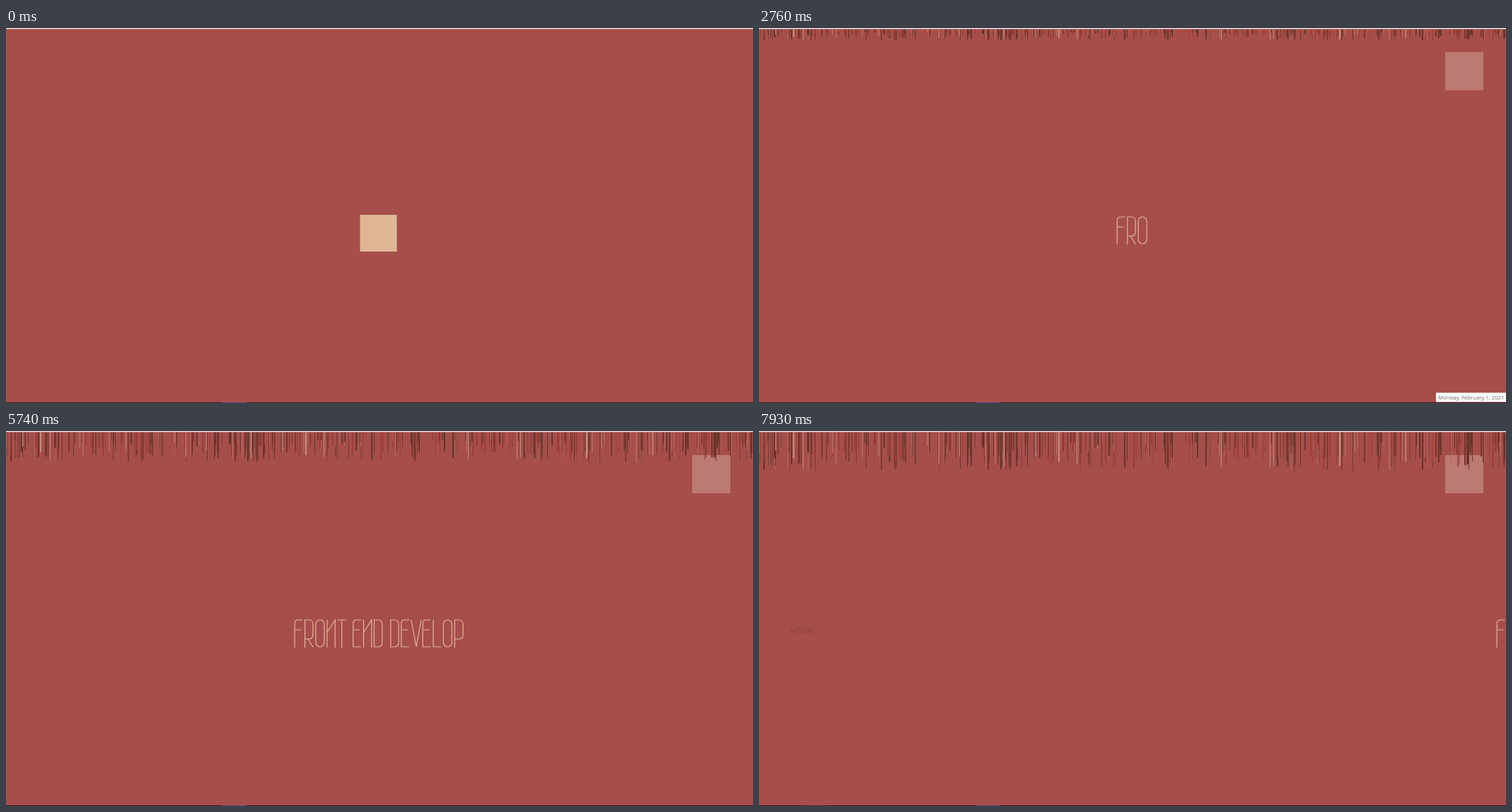
Recreate the animation shown at these times as an HTML page. Size 1056 by 530 pixels, loop 8 s.

```html
<!DOCTYPE html>
<html lang="en">
<head>
<meta charset="utf-8">
<title>Front end developer</title>
<style>
  html, body { margin: 0; width: 100%; height: 100%; overflow: hidden; background: #a64e4c; }
  svg { display: block; width: 1056px; height: 530px; }
  text { font-family: "Open Sans", sans-serif; }
  .loop { animation: 8s linear infinite both; }

  #intro { animation-name: intro; transform-origin: 526.5px 290px; fill: #dfb795; }
  @keyframes intro {
    0%, .86% { transform: none; opacity: 1; }
    .87%, 6.3% { transform: translateY(-4px); opacity: 1; }
    19.5% { transform: translateY(-2px) scale(.14); opacity: .5; }
    21%, 100% { transform: translateY(-2px) scale(0); opacity: 0; }
  }

  #corner { animation-name: corner; fill: #bd7a72; }
  @keyframes corner {
    0%, 6.4% { opacity: 0; }
    15.9%, 100% { opacity: 1; }
  }

  #fringe { animation-name: grow; transform-origin: 0 2px; }
  @keyframes grow {
    0%, 12.5% { transform: scaleY(0); }
    19.5% { transform: scaleY(.08); }
    27.4% { transform: scaleY(.2); }
    48.25% { transform: scaleY(.47); }
    56.9% { transform: scaleY(.6); }
    71.75% { transform: scaleY(.77); }
    82.6% { transform: scaleY(.9); }
    99.1%, 100% { transform: scaleY(1); }
  }

  #title { animation-name: leave; fill: none; stroke: #e0b896; stroke-width: 1.2; }
  @keyframes leave {
    0%, 79.4% { transform: none; animation-timing-function: cubic-bezier(.333, 0, .667, 0); }
    90.9%, 100% { transform: translateX(650px); }
  }

  #date { animation-name: date; animation-timing-function: step-end; }
  @keyframes date {
    0% { opacity: 0; }
    23.1% { opacity: 1; }
    53.7%, 100% { opacity: 0; }
  }

  #hover { animation-name: hover; animation-timing-function: step-end; fill: #54202c; }
  @keyframes hover {
    0% { transform: none; opacity: 0; }
    80.4% { transform: translateX(201px); opacity: 1; }
    97.6%, 100% { transform: translateX(63px); opacity: 1; }
  }

  #home { animation-name: home; fill: #94403b; font-size: 11.8px; }
  @keyframes home {
    0%, 96.9% { opacity: 0; }
    98.8%, 100% { opacity: 1; }
  }
</style>
</head>
<body>
<svg viewBox="0 0 1056 530">
  <rect width="1056" height="530" fill="#a64e4c"/>
  <rect id="corner" class="loop" x="970" y="34" width="54" height="54"/>
  <g id="fringe" class="loop"></g>
  <rect id="intro" class="loop" x="500.5" y="264" width="52" height="52"/>
  <g id="title" class="loop" role="img" aria-label="FRONT END DEVELOPER"><g id="word"></g></g>
  <text id="home" class="loop" x="43.5" y="287">HOME</text>
  <rect width="1056" height="1.4" fill="#ebe6e6"/>
  <rect y="529" width="1056" height="1" fill="#3a1420"/>
  <rect id="hover" class="loop" y="529" width="34" height="1"/>
  <rect x="306" y="529" width="34" height="1" fill="#5f4a88"/>
  <g id="date" class="loop">
    <rect x="957" y="515.5" width="99" height="13" fill="#fff"/>
    <text x="960" y="525" font-size="7.75" fill="#666">Monday, February 1, 2021</text>
  </g>
</svg>
<script>
  const LOOP = 8000, TYPE_START = 2300, TYPE_STEP = 203.5, CENTER = 527;
  const start = performance.now();
  const byId = id => document.getElementById(id);

  function add(parent, tag, attrs) {
    const node = document.createElementNS('http://www.w3.org/2000/svg', tag);
    for (const key in attrs) node.setAttribute(key, attrs[key]);
    return parent.appendChild(node);
  }

  // Hanging stripes
  let seed = 41;
  const random = () => (seed = seed * 16807 % 2147483647) / 2147483647;
  const tones = ['#66352c', '#66352c', '#7a342e', '#7f3a33', '#9d3c37', '#a03f3a', '#6e483b', '#b3645c'];
  const stripe = (x, height, fill) =>
    add(byId('fringe'), 'rect', { x, y: 2, width: random() < .65 ? 1 : 2, height, fill });

  for (let i = 0; i < 420; i++) {
    const x = Math.floor(random() * 1056);
    const height = 14 + 41 * random();
    stripe(x, height, tones[Math.floor(random() * tones.length)]);
  }
  for (const x of [23, 48, 62, 254, 283, 346, 391, 423, 449, 653, 722, 727, 820, 842, 914])
    stripe(x, 24 + 28 * random(), '#c48e7e');

  // Line lettering: [outline, advance, visible width]
  const glyphs = {
    F: ['M.7 40V6Q.7 1 6 1H12M.7 15H10', 14.5, 12],
    R: ['M.7 40V1H6Q12 1 12 7V22Q12 28 6 28H.7M5 28L12.5 40', 15.3, 13],
    O: ['M.7 7A6 6 0 0 1 12.7 7V33A6 6 0 0 1 .7 33Z', 16, 13],
    N: ['M.7 40V1M.7 19L12 1V40', 15, 12.5],
    T: ['M0 1H13M6.5 1V40', 13.5, 13],
    E: ['M12 1H6Q.7 1 .7 6V39H12M.7 15H10', 14.8, 12],
    D: ['M.7 1V39H6Q12 39 12 33V7Q12 1 6 1Z', 15, 12.5],
    V: ['M0 1L7 39L14 1', 15.6, 14],
    L: ['M.7 1V39H12', 14.3, 12],
    P: ['M.7 40V1H6Q12.5 1 12.5 7V22Q12.5 28 6.5 28H.7', 15, 13],
    ' ': ['', 8.3, 0]
  };
  let pen = 0;
  const letters = [...'FRONT END DEVELOPER'].map(char => {
    const [d, advance, width] = glyphs[char];
    const node = add(byId('word'), 'path', { d, transform: `translate(${pen} 0)` });
    const end = pen + width;
    pen += advance;
    return { node, end };
  });

  function draw(now) {
    const t = Math.max(0, now - start) % LOOP;
    const typed = Math.floor((t - TYPE_START) / TYPE_STEP) + 1;
    const count = Math.max(0, Math.min(letters.length, typed));
    letters.forEach(({ node }, i) => node.setAttribute('visibility', i < count ? 'visible' : 'hidden'));
    const width = count ? letters[count - 1].end : 0;
    byId('word').setAttribute('transform', `translate(${CENTER - width / 2} 266)`);
    requestAnimationFrame(draw);
  }
  draw(start);
</script>
</body>
</html>
```
